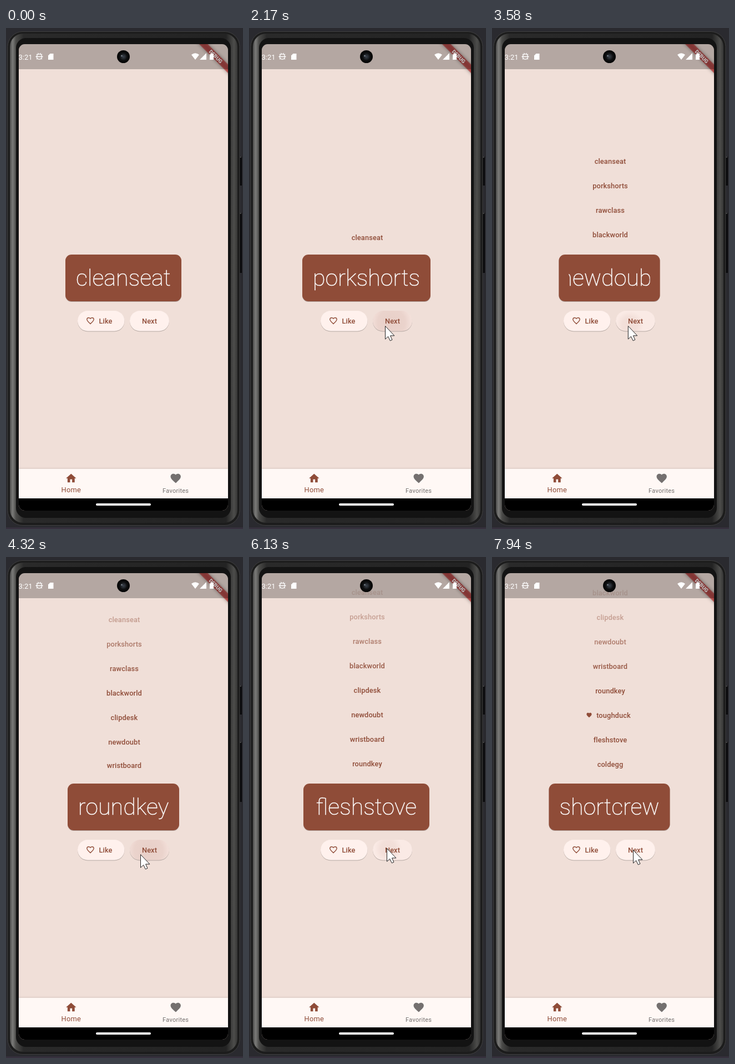
An HTML page for the animation above (8 s loop, 427 by 900 pixels).

```html
<!DOCTYPE html>
<html lang="en">
<head>
<meta charset="utf-8">
<title>Word pair generator</title>
<style>
  html, body { margin: 0; height: 100%; overflow: hidden; background: #2a2a2f; }
  #stage { display: block; width: 100vw; height: 100vh; }
  text { font-family: Roboto, sans-serif; }
  .mid { text-anchor: middle; }
  .label { font-size: 12.85px; font-weight: 500; letter-spacing: .1px; fill: #8f4c38; }
  .word { font-size: 41.3px; font-weight: 200; fill: #fff; stroke: #fff; stroke-width: .5px; }
  .raised { filter: drop-shadow(0 1px .7px rgba(0, 0, 0, .25)); }
</style>
</head>
<body>
<svg id="stage" viewBox="0 0 427 900" preserveAspectRatio="none">
  <defs>
    <path id="heart" d="M12 21.35l-1.45-1.32C5.4 15.36 2 12.28 2 8.5 2 5.42 4.42 3 7.5 3c1.74 0 3.41.81 4.5 2.09C13.09 3.81 14.76 3 16.5 3 19.58 3 22 5.42 22 8.5c0 3.78-3.4 6.86-8.55 11.54z"/>
    <path id="heartLine" d="M16.5 4c-1.74 0-3.41.81-4.5 2.4C10.91 4.81 9.24 4 7.5 4 5 4 3 6 3 8.5c0 3.3 3 6.2 9 11.5 6-5.3 9-8.2 9-11.5C21 6 19 4 16.5 4z" fill="none" stroke-width="2"/>
    <clipPath id="screen"><rect x="23" y="29" width="377" height="838" rx="11"/></clipPath>
    <clipPath id="likeClip"><rect x="129" y="508" width="84.5" height="36.5" rx="18.25"/></clipPath>
    <clipPath id="nextClip"><rect x="223" y="508" width="71" height="36.5" rx="18.25"/></clipPath>
    <linearGradient id="fade" gradientUnits="userSpaceOnUse" x1="0" y1="29" x2="0" y2="211.5">
      <stop stop-color="#fff" stop-opacity="0"/><stop offset="1" stop-color="#fff"/>
    </linearGradient>
    <mask id="listMask" maskUnits="userSpaceOnUse" x="23" y="29" width="377" height="365">
      <rect x="23" y="29" width="377" height="365" fill="url(#fade)"/>
    </mask>
    <radialGradient id="ink">
      <stop stop-color="#8f4c38"/><stop offset=".55" stop-color="#8f4c38" stop-opacity=".85"/>
      <stop offset="1" stop-color="#8f4c38" stop-opacity="0"/>
    </radialGradient>
    <linearGradient id="metal" gradientUnits="userSpaceOnUse" x1="7" y1="0" x2="417" y2="0">
      <stop stop-color="#4c4c4b"/><stop offset=".012" stop-color="#7b7b79"/>
      <stop offset=".027" stop-color="#4a4a48"/><stop offset=".06" stop-color="#2a2a2a"/>
      <stop offset=".95" stop-color="#232323"/><stop offset=".985" stop-color="#4d4d4b"/>
      <stop offset="1" stop-color="#363635"/>
    </linearGradient>
    <radialGradient id="lens">
      <stop stop-color="#3c434d"/><stop offset=".35" stop-color="#22262b"/>
      <stop offset=".6" stop-color="#0c0d0e"/><stop offset="1" stop-color="#050505"/>
    </radialGradient>
  </defs>

  <!-- phone body -->
  <rect width="427" height="900" fill="#2a2a2f"/>
  <path d="M0 898.5H427" stroke="#3b3243" stroke-width="2"/>
  <path d="M423 231V283M423 332V440" stroke="#09090b" stroke-width="4"/>
  <path d="M421 232H424M421 333H424" stroke="#777"/>
  <rect x="3" y="6.5" width="418" height="887" rx="27" fill="#1c1c1c" stroke="#3f3f3f"/>
  <rect x="7" y="10" width="410" height="879" rx="24" fill="url(#metal)"/>
  <rect x="18" y="18" width="387" height="862" rx="18" fill="#131313"/>

  <g clip-path="url(#screen)">
    <rect x="23" y="29" width="377" height="838" fill="#f0dfd8"/>
    <g id="list" mask="url(#listMask)"></g>

    <rect id="card" class="raised" y="407" height="84" rx="11" fill="#8f4c38"/>
    <svg id="cardBox" y="407" height="84"><text id="cardWord" class="word mid" y="56"/></svg>

    <rect class="raised" x="129" y="508" width="84.5" height="36.5" rx="18.25" fill="#fff1ed"/>
    <rect class="raised" x="223" y="508" width="71" height="36.5" rx="18.25" fill="#fff1ed"/>
    <g id="press">
      <rect id="tint" x="100" y="500" width="220" height="60" fill="#8f4c38"/>
      <circle id="ripple" fill="url(#ink)"/>
    </g>
    <g transform="translate(143.75 517.75) scale(.688)" fill="#8f4c38" stroke="#8f4c38">
      <use id="unliked" href="#heartLine"/><use id="liked" href="#heart" stroke="none"/>
    </g>
    <text class="label" x="167.5" y="530.7">Like</text>
    <text class="label mid" x="258.5" y="530.7">Next</text>

    <!-- bottom navigation -->
    <rect x="23" y="792" width="377" height="60" fill="#fff8f5" style="filter:drop-shadow(0 -1px 1.5px rgba(0,0,0,.1))"/>
    <path transform="translate(106.3 798) scale(.917)" fill="#8f4c38" d="M10 20v-6h4v6h5v-8h3L12 3 2 12h3v8z"/>
    <text class="mid" x="117.3" y="834" font-size="12.85" letter-spacing=".22" fill="#8f4c38">Home</text>
    <use href="#heart" transform="translate(294.7 798) scale(.917)" fill="#74706f"/>
    <text class="mid" x="305.7" y="834.5" font-size="11" letter-spacing=".26" fill="#74706f">Favorites</text>
    <rect x="23" y="845" width="377" height="23"/>
    <rect x="162" y="854" width="99" height="4" rx="2" fill="#fff"/>

    <!-- debug ribbon and status bar -->
    <g transform="translate(400 29) rotate(45)">
      <rect x="-60" y="25.7" width="120" height="11" fill="#b71c1c" fill-opacity=".63" style="filter:drop-shadow(0 0 3px rgba(0,0,0,.6))"/>
      <text class="mid" y="34.6" font-size="9.35" font-weight="900" fill="#fff">DEBUG</text>
    </g>
    <rect x="23" y="29" width="377" height="45" fill-opacity=".25"/>
    <g fill="#fff">
      <text x="22.5" y="56.5" font-size="13">3:21</text>
      <g fill="none" stroke="#fff" stroke-width="1.3">
        <circle cx="60" cy="51.5" r="4.6"/>
        <path d="M53.5 51.5H66.5M55 47L57 48.5M65 47L63 48.5M55 56L57 54.5M65 56L63 54.5M57.5 45L58.5 47M62.5 45L61.5 47"/>
      </g>
      <path d="M79.5 46H85.5V57H76V49.5Z"/>
      <path d="M334 48Q341 42.5 348 48L341 57ZM361 45V57H349ZM367 47H369V45.5H372V47H374V57H367Z"/>
    </g>
  </g>
  <circle cx="211.5" cy="51.5" r="11.5" fill="url(#lens)"/>
  <circle cx="208.5" cy="50" r="1.3" fill="#7e8791"/>

  <circle id="spot" r="18" fill="#fff04a" fill-opacity=".78"/>
  <path id="cursor" d="M.5 .5V24L5.7 19.2L9.3 26.8L13 25.1L9.6 17.8H17Z" fill="#fff" stroke="#222" stroke-width="1" stroke-linejoin="round"/>
</svg>

<script>
const LOOP = 8000, ROW = 44, LIST_BOTTOM = 394, GROW = 300, RESIZE = 200;
const CENTER = 211.5, CARD_PADDING = 36;

// word, card width, time it becomes current
const words = [
  ["cleanseat", 209, -1000], ["porkshorts", 231, 1930], ["rawclass", 196, 2370],
  ["blackworld", 230, 2990], ["clipdesk", 182, 3230], ["newdoubt", 215, 3580],
  ["wristboard", 229, 3815], ["roundkey", 201, 4054], ["toughduck", 227, 4470],
  ["fleshstove", 218, 6130], ["coldegg", 179, 6420], ["shortcrew", 218, 7120]
].map(([text, width, at]) => ({ text, width, at }));
const favorite = words[8], LIKED_AT = 5340;

// pointer down, pointer up, moment the app reacts, button
const clicks = [
  [1690, 1900, 1930], [2250, 2360, 2370], [2920, 2985, 2990], [3130, 3220, 3230],
  [3480, 3570, 3580], [3720, 3805, 3815], [3960, 4045, 4054], [4390, 4460, 4470],
  [5200, 5330, LIKED_AT, "like"], [6000, 6120, 6130], [6310, 6410, 6420], [6950, 7090, 7120]
].map(([down, up, at, button = "next"]) => ({ down, up, at, button }));

const cursorPath = [
  [330, 314, 814], [640, 258, 620], [890, 226, 440], [1090, 206, 513], [1190, 206, 513],
  [1360, 242, 535], [1540, 242, 535], [1690, 245, 535], [3560, 245, 535], [3700, 242, 534],
  [4650, 242, 534], [4970, 170, 527], [5100, 170, 527], [5190, 163, 524], [5500, 163, 524],
  [5870, 248, 523], [6800, 248, 523], [6880, 248, 525], [7250, 248, 525], [7540, 240, 532],
  [7590, 240, 532], [7730, 208, 530], [7940, 254, 526]
];

const $ = id => document.getElementById(id);
const clamp = v => Math.max(0, Math.min(1, v));
const mix = (a, b, k) => a + (b - a) * k;
const set = (el, attrs) => { for (const k in attrs) el.setAttribute(k, attrs[k]); };
const show = (el, on) => el.setAttribute("visibility", on ? "visible" : "hidden");
const add = (parent, tag, attrs) => {
  const el = document.createElementNS("http://www.w3.org/2000/svg", tag);
  set(el, attrs);
  return parent.appendChild(el);
};

const rows = words.slice(0, -1).map(word => {
  const isFavorite = word === favorite;
  const box = add($("list"), "svg", { x: 0, width: 427 });
  const content = add(box, "g", {});
  add(content, "text", { class: "label mid", x: isFavorite ? 219 : 213, y: 4.6 }).textContent = word.text;
  if (isFavorite) add(content, "use", { href: "#heart", transform: "translate(169.5 -5.5) scale(.458)", fill: "#8f4c38" });
  return { box, content };
});

function cursorAt(t) {
  const i = cursorPath.findIndex(p => p[0] > t);
  if (i < 0) return cursorPath.at(-1).slice(1);
  if (i === 0) return cursorPath[0].slice(1);
  const [a, b] = [cursorPath[i - 1], cursorPath[i]];
  const k = (t - a[0]) / (b[0] - a[0]), ease = k * k * (3 - 2 * k);
  return [mix(a[1], b[1], ease), mix(a[2], b[2], ease)];
}

function drawList(t) {
  let bottom = LIST_BOTTOM;
  for (let i = rows.length - 1; i >= 0; i--) {
    const { box, content } = rows[i];
    const height = ROW * clamp((t - words[i + 1].at) / GROW);
    bottom -= height;
    set(box, { y: bottom, height });
    set(content, { transform: `translate(0 ${height / 2})` });
    show(box, height > 3);
  }
}

function drawCard(t) {
  const index = words.findLastIndex(w => t >= w.at);
  const word = words[index], before = words[Math.max(0, index - 1)];
  const width = mix(before.width, word.width, clamp((t - word.at) / RESIZE));
  const inner = width - CARD_PADDING;
  set($("card"), { x: CENTER - width / 2, width });
  set($("cardBox"), { x: CENTER - inner / 2, width: inner });
  set($("cardWord"), { x: inner / 2 });
  $("cardWord").textContent = word.text;
  const isLiked = word === favorite && t >= LIKED_AT;
  show($("liked"), isLiked);
  show($("unliked"), !isLiked);
}

function drawPress(t) {
  const click = clicks.findLast(c => t >= c.down);
  show($("press"), click);
  if (!click) return;
  const age = t - click.at + 100;
  const [x, y] = cursorAt(click.down);
  const drift = clamp(age / 500);
  const fadeOut = 1 - clamp((age - 480) / 270);
  set($("press"), { "clip-path": `url(#${click.button}Clip)` });
  set($("tint"), { opacity: .045 * clamp((t - click.down) / 50) * fadeOut });
  set($("ripple"), {
    cx: mix(x, click.button === "like" ? 171 : 262, drift),
    cy: mix(y, 526, drift),
    r: mix(16, 58, drift),
    opacity: .17 * clamp(age / 220) * fadeOut
  });
}

function draw(t) {
  drawList(t);
  drawCard(t);
  drawPress(t);
  const move = `translate(${cursorAt(t).join(" ")})`;
  set($("cursor"), { transform: move });
  set($("spot"), { transform: move });
  show($("cursor"), t >= 330);
  show($("spot"), clicks.some(c => t >= c.down && t < c.up));
}

const start = performance.now();
function tick() {
  draw((performance.now() - start) % LOOP);
  requestAnimationFrame(tick);
}
tick();
</script>
</body>
</html>
```
